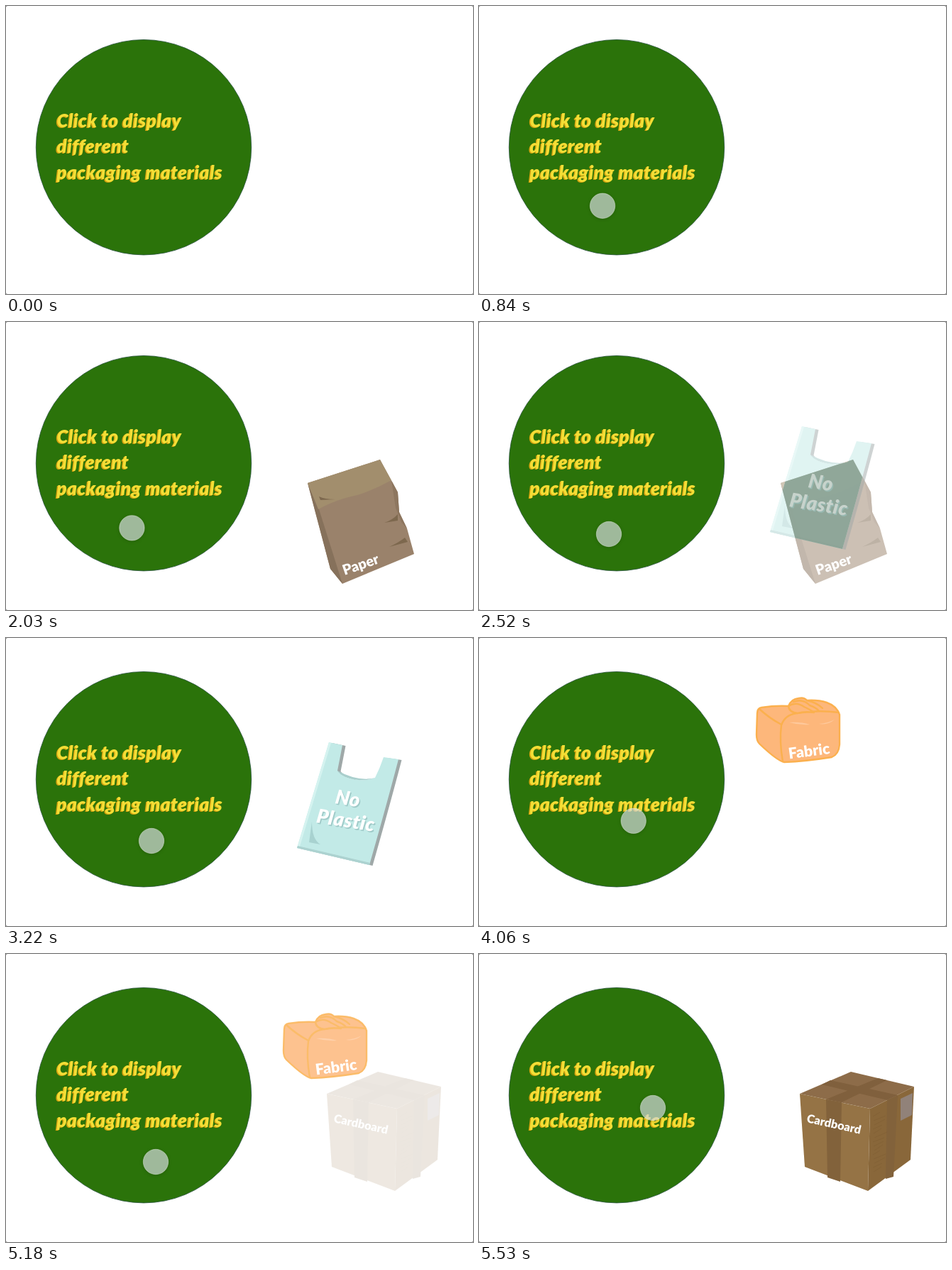
An HTML page for the animation above (5.6 s loop, 658 px wide and 406 px high).

```html
<!DOCTYPE html>
<html lang="en">
<head>
<meta charset="utf-8">
<title>Packaging materials</title>
<style>
  html, body { margin: 0; width: 100%; height: 100%; overflow: hidden; background: #8a8a8a; }
  svg { display: block; width: 658px; height: 406px; }
  text { font-family: Lato, "Open Sans", sans-serif; font-weight: 900; fill: #fff; }
  .title text, .plastic text { font-style: italic; }
  .title { font-size: 26px; letter-spacing: .5px; }
  .title text { fill: #f3de36; }
  .title .shade text { fill: #d3a010; }
  .plastic { font-size: 27.5px; letter-spacing: .5px; }
  .plastic .shade text { fill: #9fcac8; }
  [data-item] { opacity: 0; }
</style>
</head>
<body>
<svg viewBox="0 0 658 406">
  <defs>
    <path id="bag" d="M455 147 L474 151 Q470 172 467 187 Q474 197 496 200 Q511 201 520 197 Q527 183 532 168 L553 171 Q536 236 512 320 L410 296 Z"/>
    <path id="sack" d="M425 227 L527 194 L542 222 L552 240 L554 268 L565 291 L575 327 L474 369 L457 348 Z"/>
    <clipPath id="sackClip"><use href="#sack"/></clipPath>
    <filter id="soft" x="-40%" y="-40%" width="180%" height="180%" color-interpolation-filters="sRGB">
      <feDropShadow dx="0" dy="1" stdDeviation="2" flood-opacity=".25"/>
    </filter>
  </defs>
  <rect width="658" height="406" rx="2.5" fill="#fff"/>

  <circle cx="194" cy="199.2" r="151.7" fill="#2b730a" stroke="#24503a" stroke-width=".8"/>
  <g class="title">
    <g class="shade" transform="translate(-1 1.2)">
      <text x="71" y="171">Click to display</text>
      <text x="71" y="207">different</text>
      <text x="71" y="244">packaging materials</text>
    </g>
    <text x="71.5" y="171">Click to display</text>
    <text x="71.5" y="207">different</text>
    <text x="71.5" y="244">packaging materials</text>
  </g>

  <g data-item="paper">
    <use href="#sack" fill="#9a826b"/>
    <path d="M425 227 L441 264 L474 369 L457 348 Z" fill="#86715b"/>
    <path d="M425 227 L527 194 L543 223 Q520 236 495 244 Q465 250 440 264 Z" fill="#a28e6d"/>
    <path d="M441 246 Q449 250 464 250 L443 251 Z M533 283 Q545 279 552 271 L552 280 Z M540 317 Q553 311 562 304 L566 310 Z" fill="#7d684e"/>
    <path d="M543 223 L552 240 L554 268 L565 291 L557 282 L549 262 Z" fill="#8d765f"/>
    <text font-size="20" transform="translate(477 357) rotate(-19)">Paper</text>
  </g>

  <g data-item="plastic">
    <use href="#bag" x="4.5" y="1" fill="#9fa8a8"/>
    <use href="#bag" fill="#c2eae7"/>
    <path d="M455 147 L410 296 L413 297 L458 148 Z" fill="#d5f3f0"/>
    <path d="M410 296 L512 320 L513 317 L411 293 Z" fill="#acd2d0"/>
    <path d="M431 259 Q431 284 443 291 L427 288 Z" fill="#a8d2d0"/>
    <path d="M467 187 Q474 197 496 200 Q511 201 520 197 Q496 203 467 187 Z" fill="#a9cfcd"/>
  </g>
  <g id="overlap" clip-path="url(#sackClip)" opacity="0"><use href="#bag" fill="#829c8d"/></g>
  <g data-item="plastic" class="plastic">
    <g class="shade" transform="translate(1.5 1.8)">
      <text transform="translate(463 233) rotate(9)">No</text>
      <text transform="translate(436.5 260) rotate(9)">Plastic</text>
    </g>
    <text transform="translate(463 233) rotate(9)">No</text>
    <text transform="translate(436.5 260) rotate(9)">Plastic</text>
  </g>

  <g data-item="fabric" stroke="#fbb04e" stroke-width="2.4" stroke-linejoin="round" stroke-linecap="round" fill="#fdb77b">
    <path d="M398 98 Q417 95 436 96 Q440 86 450 85 Q458 83 462 88 Q478 87 490 91 Q504 96 508 108 L508 150 Q507 164 497 168 Q460 174 430 175 Q420 173 395 149 Q391 145 391 136 L392 106 Q392 99 398 98 Z"/>
    <path d="M428 174 Q423 145 426 123 Q431 108 448 106 Q477 101 507 105" fill="none"/>
    <path d="M395 100 Q409 113 426 122" fill="none"/>
    <path d="M436 96 Q447 89 458 97 Q467 101 472 105 Q458 103 449 106 Q437 105 436 96 Z"/>
    <path d="M443 90 Q456 85 466 95 Q475 98 479 103 M462 88 Q476 91 484 99" fill="none"/>
    <path d="M437 119 Q453 118 466 122 Q451 123 437 119 Z M479 121 Q492 120 501 115 Q492 123 479 121 Z" stroke="none" fill="#fec99c"/>
    <text stroke="none" font-size="21.5" fill="#fff" transform="translate(437 170.5) rotate(-7.5)">Fabric</text>
  </g>

  <g data-item="cardboard">
    <path d="M452 197 L524 166 L613 187 L551 218 Z" fill="#8d6c49"/>
    <path d="M452 197 L551 218 L548 334 L459 300 Z" fill="#957345"/>
    <path d="M551 218 L613 187 L608 290 L548 334 Z" fill="#89673a"/>
    <path d="M489 205 L562 175 L575 178 L511 209 Z M483 184 L495 178 L590 199 L575 206 Z" fill="#80603d"/>
    <path d="M489 205 L511 209 L509 321 L491 315 Z M575 206 L590 199 L584 314 L573 317 Z" fill="#82623b"/>
    <path d="M594 204 L611 196 L610 227 L594 235 Z" fill="#918279"/>
    <g id="hatch" stroke="#7b5b32" stroke-width=".7" opacity=".6"></g>
    <text font-size="16.4" transform="translate(461 237) rotate(12.5)">Cardboard</text>
  </g>

  <circle id="cursor" r="17.7" fill="rgba(226,232,236,.65)" stroke="rgba(235,240,235,.45)" filter="url(#soft)" visibility="hidden"/>
</svg>
<script>
  const LOOP = 5600, STEP = 70, FADE = 320;
  const $ = id => document.getElementById(id);

  // start of each item's fade-in; the previous item fades out meanwhile
  const items = [['paper', 1040], ['plastic', 2360], ['fabric', 3720], ['cardboard', 5130]];

  // cursor path: time, x, y
  const path = [
    [140, 250, 222], [600, 195, 270], [1000, 166, 284], [1540, 169, 272],
    [2300, 182, 301], [2520, 183, 299], [3220, 205, 286], [3650, 208, 294],
    [4000, 215, 268], [4480, 238, 181], [5030, 208, 298], [5180, 211, 293], [5530, 245, 217]
  ];

  for (let i = 0; i < 14; i++) {
    const line = document.createElementNS('http://www.w3.org/2000/svg', 'path');
    line.setAttribute('d', `M${555 + i % 3} ${229 + i * 6} l${10 + i * 7 % 9} ${-6 - i % 3}`);
    $('hatch').append(line);
  }

  const clamp = (v, a, b) => Math.min(b, Math.max(a, v));
  const ramp = (t, start) => clamp((t - start) / FADE, 0, 1);

  function slope(i, k) {
    const a = path[Math.max(i - 1, 0)], b = path[Math.min(i + 1, path.length - 1)];
    return (b[k] - a[k]) / (b[0] - a[0]);
  }

  function along(t, k) {
    const next = path.findIndex(p => p[0] > t);
    if (next < 0) return path[path.length - 1][k];
    const i = Math.max(next - 1, 0), a = path[i], b = path[i + 1];
    const d = b[0] - a[0], u = clamp((t - a[0]) / d, 0, 1), v = 1 - u;
    return v * v * (1 + 2 * u) * a[k] + u * u * (3 - 2 * u) * b[k]
      + d * u * v * (v * slope(i, k) - u * slope(i + 1, k));
  }

  function draw(t) {
    items.forEach(([name, start], i) => {
      const out = items[i + 1] ? ramp(t, items[i + 1][1]) : 0;
      const alpha = ramp(t, start) * (1 - out);
      document.querySelectorAll(`[data-item=${name}]`).forEach(el => el.style.opacity = alpha);
    });
    const mix = ramp(t, items[1][1]);
    $('overlap').setAttribute('opacity', 3.2 * mix * (1 - mix));

    const cursor = $('cursor');
    cursor.setAttribute('visibility', t >= path[0][0] ? 'visible' : 'hidden');
    cursor.setAttribute('transform', `translate(${along(t, 1)} ${along(t, 2)})`);
  }

  const begin = performance.now();
  function tick(now) {
    const t = Math.max(0, now - begin) % LOOP;
    draw(Math.floor(t / STEP) * STEP);
    requestAnimationFrame(tick);
  }
  draw(0);
  requestAnimationFrame(tick);
</script>
</body>
</html>
```
